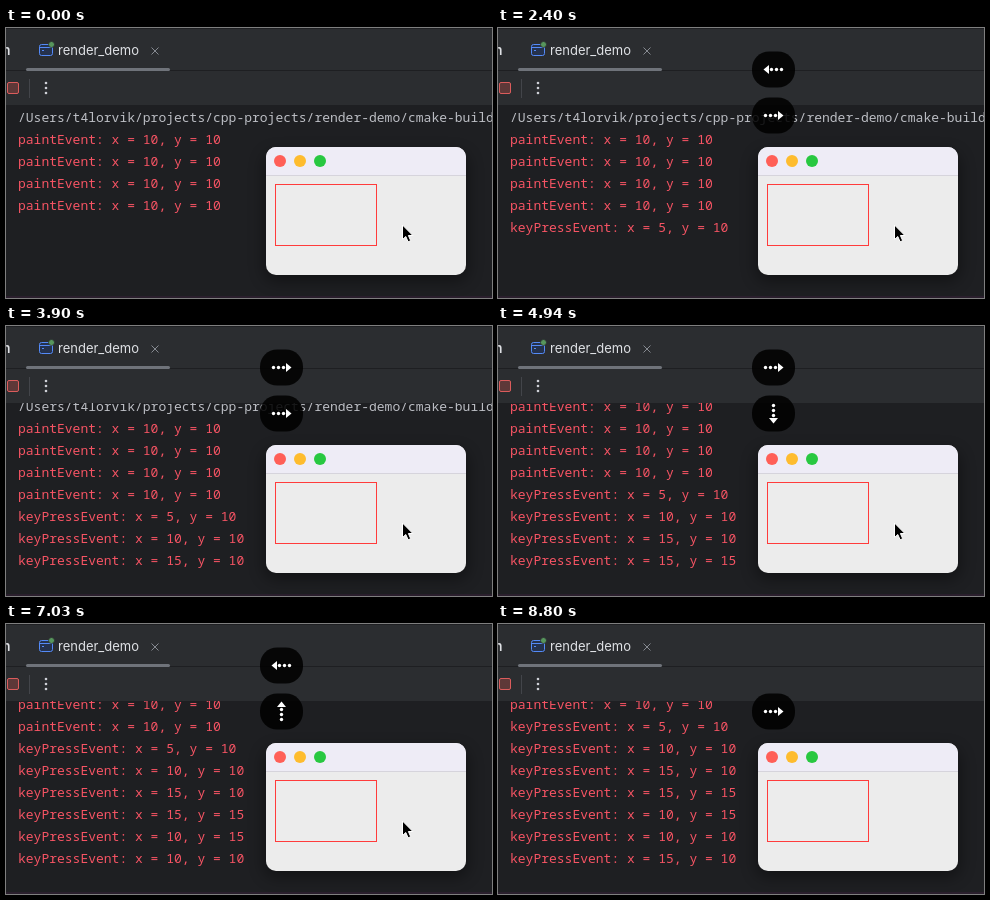
An HTML page that plays this animation: 486 px wide and 270 px high, repeating every 8940 ms.

```html
<!DOCTYPE html>
<html lang="en">
<head>
<meta charset="utf-8">
<title>render_demo</title>
<style>
  html, body { margin: 0; width: 100%; height: 100%; overflow: hidden; background: #1e1f22; }
  svg { display: block; width: 100vw; height: 100vh; }
  .ui { font: 13px Inter, sans-serif; fill: #dfe1e5; }
  #log { font: 13px "Noto Sans Mono", "DejaVu Sans Mono", monospace; fill: #f75464; white-space: pre; }
  #log text:first-child { fill: #bcbec4; }
</style>
</head>
<body>
<svg viewBox="0 0 486 270">
  <defs>
    <clipPath id="console"><rect y="77" width="486" height="191"/></clipPath>
    <clipPath id="frame"><rect x="260" y="119" width="200" height="128" rx="10"/></clipPath>
    <filter id="blur" x="-30%" y="-30%" width="160%" height="160%"><feGaussianBlur stdDeviation="8"/></filter>
    <g id="arrow" fill="#fff">
      <circle cx="-8" r="1.7"/><circle cx="-3" r="1.7"/><circle cx="2" r="1.7"/>
      <path d="M4.5-4.5 10 0 4.5 4.5Z"/>
    </g>
  </defs>

  <!-- IDE panel -->
  <rect width="486" height="270" fill="#1e1f22"/>
  <rect y="1" width="486" height="76" fill="#2b2d30"/>
  <rect y="42" width="486" height="1" fill="#1e1f22"/>
  <rect y="268" width="486" height="2" fill="#2a1f2d"/>
  <text class="ui" x="4.5" y="27" text-anchor="end" font-weight="600" style="font-weight:600">Run</text>
  <rect x="20" y="40" width="144" height="3" rx="1.5" fill="#6f737a"/>
  <rect x="33.5" y="16.5" width="13" height="11" rx="2" fill="#25324d" stroke="#548af7"/>
  <path d="M34 19.5H46M36 22.5h2" stroke="#548af7"/>
  <circle cx="45.5" cy="16.5" r="3" fill="#57965c" stroke="#2b2d30" stroke-width=".8"/>
  <text class="ui" x="52" y="27">render_demo</text>
  <path d="M145.500 19.500l7 7m0-7l-7 7" stroke="#868a91"/>
  <rect x="1.500" y="54.500" width="11" height="11" rx="1.500" fill="#5e3838" stroke="#db5c5c"/>
  <path d="M23.500 51V70" stroke="#43454a"/>
  <g fill="#ced0d6"><circle cx="40" cy="55" r="1.300"/><circle cx="40" cy="60" r="1.300"/><circle cx="40" cy="65" r="1.300"/></g>
  <g clip-path="url(#console)"><g id="log"></g></g>

  <!-- application window -->
  <rect x="258" y="125" width="204" height="128" rx="12" opacity=".4" filter="url(#blur)"/>
  <g clip-path="url(#frame)">
    <rect x="260" y="119" width="200" height="128" fill="#ececec"/>
    <rect x="260" y="119" width="200" height="28" fill="#eeecf6"/>
    <rect x="260" y="147" width="200" height="1" fill="#d6d4dc"/>
  </g>
  <circle cx="274" cy="133" r="6" fill="#ff5f57"/>
  <circle cx="294" cy="133" r="6" fill="#febc2e"/>
  <circle cx="314" cy="133" r="6" fill="#28c840"/>
  <rect x="269.500" y="156.500" width="101" height="61" fill="none" stroke="#ff3b3b"/>

  <g id="keys"></g>
  <path id="cursor" d="M0 0V14.500L3.300 11.500 5.600 16.800 8.200 15.700 5.900 10.500H10.400Z" stroke="#fff"/>
</svg>
<script>
  const LOOP = 8940;
  const $ = id => document.getElementById(id);

  // Console lines: [time, text]
  const paint = [0, "paintEvent: x = 10, y = 10"];
  const key = (time, x, y) => [time, `keyPressEvent: x = ${x}, y = ${y}`];
  const lines = [
    [0, "/Users/t4lorvik/projects/cpp-projects/render-demo/cmake-build-debug"],
    paint, paint, paint, paint,
    key(1800, 5, 10), key(2700, 10, 10), key(3900, 15, 10), key(4940, 15, 15),
    key(5840, 10, 15), key(7030, 10, 10), key(7620, 15, 10)
  ];

  // Key overlays: arrow angle, press, start of fade, end
  const presses = [
    [180, 1500, 3900, 3900],
    [0, 2400, 4350, 4640],
    [0, 3600, 5540, 5840],
    [90, 4640, 6590, 6890],
    [180, 5540, 7620, 7910],
    [270, 6740, 8500, 8800],
    [0, 7330, LOOP, LOOP]
  ];

  // Pointer positions: [time, x, y]
  const pointer = [
    [0, 396.5, 197], [8210, 404, 205], [8350, 427, 226],
    [8500, 451, 246], [8650, 471, 262], [8800, 490, 280]
  ];

  $("log").innerHTML = lines.map(([, s], i) => `<text x="12" y="${94 + 22 * i}">${s}</text>`).join("");
  const rows = [...$("log").children];

  function pill([angle, , fade, end], slot, t) {
    const alpha = t < fade ? 1 : t < (fade + end) / 2 ? 0.7 : 0.35;
    return `<g transform="translate(275.5 ${87.5 - 46 * slot})" opacity="${alpha}">
      <rect x="-21.5" y="-18" width="43" height="36" rx="17" fill-opacity=".87"/>
      <use href="#arrow" transform="rotate(${angle})"/></g>`;
  }

  function draw(t) {
    const count = lines.filter(l => l[0] <= t).length;
    rows.forEach((row, i) => row.style.display = i < count ? "" : "none");
    $("log").setAttribute("transform", `translate(0 ${-Math.max(0, (count - 8) * 22 + 9)})`);

    const pressed = presses.filter(p => p[1] <= t);
    $("keys").innerHTML = pressed
      .map((p, i) => t < p[3] ? pill(p, pressed.length - 1 - i, t) : "").join("");

    const [, x, y] = pointer.filter(p => p[0] <= t).pop();
    $("cursor").setAttribute("transform", `translate(${x} ${y})`);
  }

  const start = performance.now();
  function tick() {
    draw((performance.now() - start) % LOOP);
    requestAnimationFrame(tick);
  }
  tick();
</script>
</body>
</html>
```
